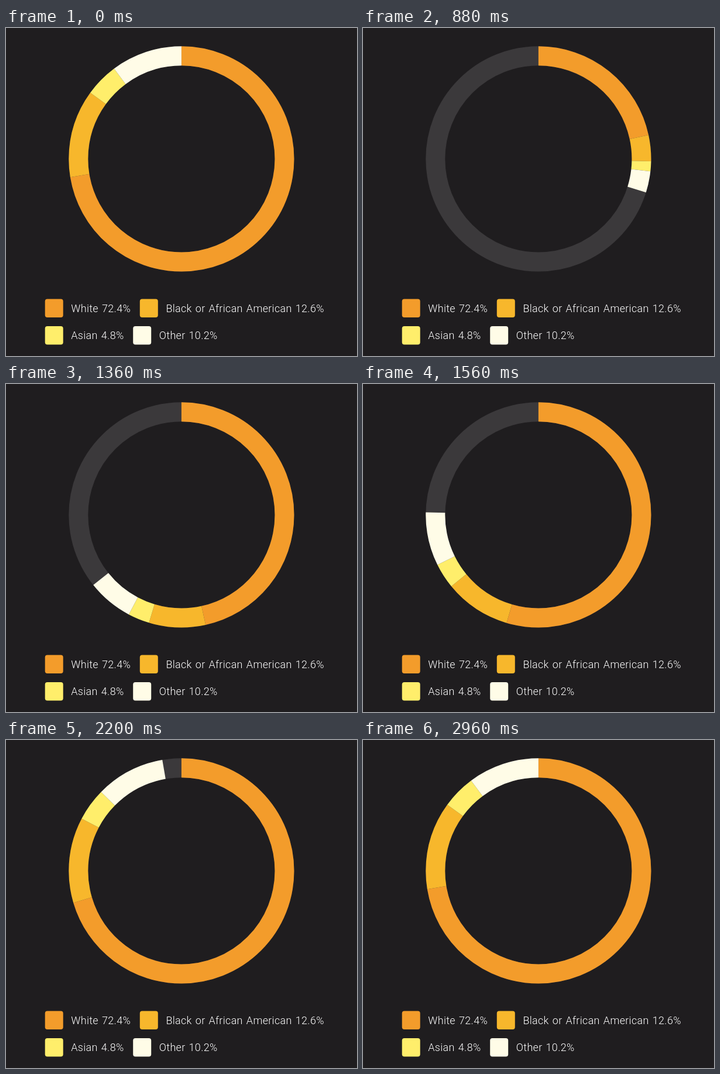
Animation, 600 px wide and 561 px high, one loop 3000 ms. Source, as an HTML page:

```html
<!DOCTYPE html>
<html lang="en">
<head>
<meta charset="utf-8">
<title>Population ring</title>
<style>
  html, body { margin: 0; width: 100%; height: 100%; overflow: hidden; background: #1f1d1f; }
  svg { display: block; width: 600px; height: 561px; }
  circle { fill: none; stroke-width: 33; }
  text { font: 300 18px Roboto, sans-serif; letter-spacing: .3px; word-spacing: 1.35px; fill: #fff; }
</style>
</head>
<body>
<svg id="stage" viewBox="0 0 600 561"></svg>
<script>
const LOOP = 3000, START = 553.5, DURATION = 1945, POWER = 1.92;

const groups = [
  { label: 'White', percent: 72.4, color: '#f39c2b', x: 66.7, y: 463.6 },
  { label: 'Black or African American', percent: 12.6, color: '#f7b72c', x: 228.8, y: 463.6 },
  { label: 'Asian', percent: 4.8, color: '#ffee6b', x: 66.7, y: 510 },
  { label: 'Other', percent: 10.2, color: '#fffce7', x: 217.2, y: 510 }
];

const stage = document.getElementById('stage');

function add(name, attrs, content = '') {
  const node = document.createElementNS('http://www.w3.org/2000/svg', name);
  for (const key in attrs) node.setAttribute(key, attrs[key]);
  node.textContent = content;
  return stage.appendChild(node);
}

function addRing(color) {
  return add('circle', {
    cx: 299.9, cy: 223.9, r: 176.1, stroke: color, pathLength: 100,
    transform: 'rotate(-90 299.9 223.9)'
  });
}

addRing('#3b393b');
for (const group of groups) {
  const { label, percent, color, x, y } = group;
  group.arc = addRing(color);
  add('rect', { x, y, width: 31, height: 31.5, rx: 4, fill: color });
  add('text', { x: x + 44.6, y: y + 22.3 }, `${label} ${percent}%`);
}

// The full ring holds across the loop seam, empties at START and eases out to full again.
function progress(time) {
  const elapsed = (time - START + LOOP) % LOOP;
  return 1 - (1 - Math.min(elapsed / DURATION, 1)) ** POWER;
}

function draw(time) {
  const scale = progress(time % LOOP);
  let from = 0;
  for (const { arc, percent } of groups) {
    const length = percent * scale;
    arc.setAttribute('stroke-dasharray', `${length} 200`);
    arc.setAttribute('stroke-dashoffset', -from);
    from += length;
  }
}

const origin = performance.now();
function tick(now) {
  draw(Math.max(0, now - origin));
  requestAnimationFrame(tick);
}
draw(0);
requestAnimationFrame(tick);
</script>
</body>
</html>
```
